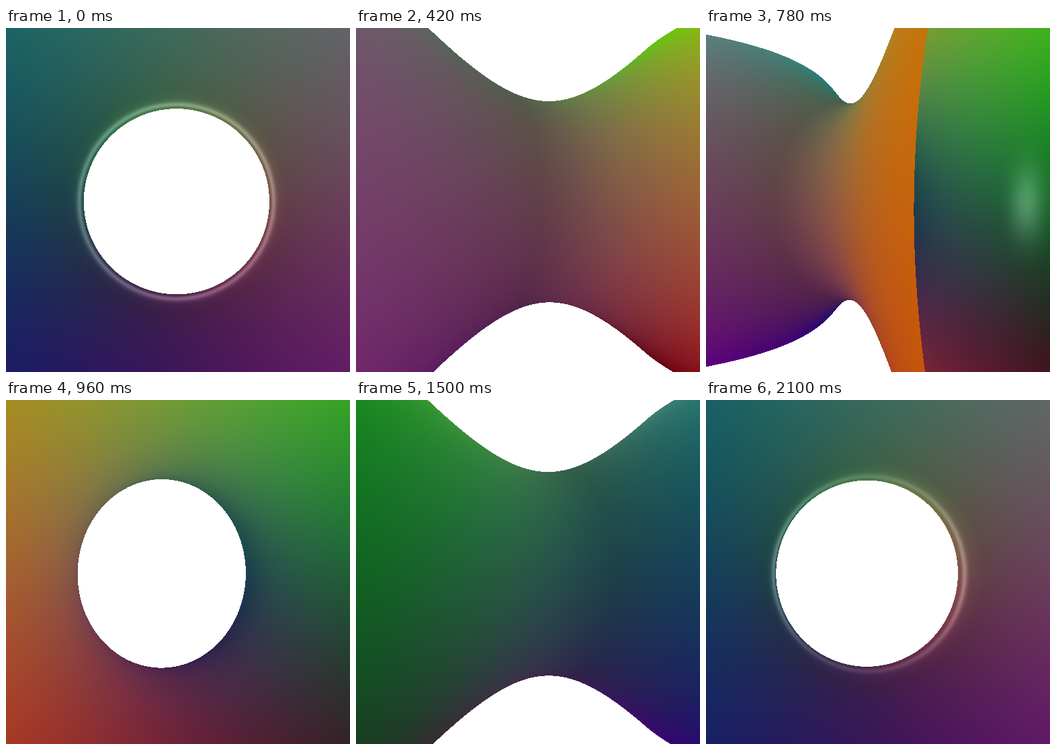
Animation, 512 px wide and 512 px high, one loop 2.16 s. Source, as an HTML page with a canvas:

```html
<!DOCTYPE html>
<html lang="en">
<head>
<meta charset="utf-8">
<title>Turning hyperboloid</title>
<style>
  html, body { margin: 0; width: 100%; height: 100%; overflow: hidden; background: #fff; }
  canvas { display: block; width: 100vw; height: 100vh; }
</style>
</head>
<body>
<canvas id="stage" width="512" height="512"></canvas>
<script>
const SIZE = 512, HALF = SIZE / 2;
const STEP = 60, STEPS = 36;
const DIST = 3.24;             // camera distance, in neck radii
const FOCAL = 470;             // pixels
const BOX = 2;                 // half side of the clipping cube
const AMBIENT = 0.5, DIFFUSE = 0.28, SPECULAR = 0.21, SHINE = 64;

// The surface sits slightly off the middle of the cube, which the camera circles.
const CENTER = { x: -0.016, y: -0.017, z: -0.013 };
const LIGHT = { x: -CENTER.x, y: -CENTER.y, z: -DIST - CENTER.z };

const ctx = document.getElementById('stage').getContext('2d');
const image = ctx.createImageData(SIZE, SIZE);
const data = image.data;

const inBox = (x, y, z) =>
  Math.abs(x + CENTER.x) <= BOX &&
  Math.abs(y + CENTER.y) <= BOX &&
  Math.abs(z + CENTER.z) <= BOX;

// Colour of a surface point seen along the ray (dx, dy, dz).
function shade(i, x, y, z, dx, dy, dz) {
  const n = -1 / Math.hypot(x, y, z);
  const nx = x * n, ny = y * n, nz = -z * n;

  let lx = LIGHT.x - x, ly = LIGHT.y - y, lz = LIGHT.z - z;
  const l = 1 / Math.hypot(lx, ly, lz);
  lx *= l; ly *= l; lz *= l;

  const facing = Math.max(0, nx * lx + ny * ly + nz * lz);
  let shine = 0;
  if (facing > 0) {
    const rx = 2 * facing * nx - lx;
    const ry = 2 * facing * ny - ly;
    const rz = 2 * facing * nz - lz;
    const glint = -(rx * dx + ry * dy + rz * dz) / Math.hypot(dx, dy, dz);
    if (glint > 0) shine = 255 * SPECULAR * Math.pow(glint, SHINE);
  }

  const lit = 255 * (AMBIENT + DIFFUSE * facing);
  data[i] = lit * (0.5 + 0.5 * (x + CENTER.x) / BOX) + shine;
  data[i + 1] = lit * (0.5 + 0.5 * (y + CENTER.y) / BOX) + shine;
  data[i + 2] = lit * (0.5 + 0.5 * (z + CENTER.z) / BOX) + shine;
}

// Casts one ray per pixel at x² + y² - z² = 1.
function render(angle) {
  const s = Math.sin(angle), c = Math.cos(angle);
  const ox = DIST * s - CENTER.x, oy = -CENTER.y, oz = DIST * c - CENTER.z;
  const e = ox * ox + oy * oy - oz * oz - 1;
  data.fill(255);

  for (let py = 0, i = 0; py < SIZE; py++) {
    const dy = (HALF - py - 0.5) / FOCAL;
    for (let px = 0; px < SIZE; px++, i += 4) {
      const u = (px + 0.5 - HALF) / FOCAL;
      const dx = u * c - s, dz = -u * s - c;
      const a = dx * dx + dy * dy - dz * dz;
      const b = ox * dx + oy * dy - oz * dz;
      const disc = b * b - a * e;
      if (disc < 0) continue;

      const q = -(b + (b < 0 ? -1 : 1) * Math.sqrt(disc));
      const t1 = q / a, t2 = e / q;
      let t = Math.min(t1, t2);
      for (let k = 0; k < 2; k++) {
        const x = ox + t * dx, y = oy + t * dy, z = oz + t * dz;
        if (t > 0 && inBox(x, y, z)) {
          shade(i, x, y, z, dx, dy, dz);
          break;
        }
        t = Math.max(t1, t2);
      }
    }
  }
  ctx.putImageData(image, 0, 0);
}

const start = performance.now();
let shown = -1;

function tick() {
  const step = Math.floor((performance.now() - start) / STEP) % STEPS;
  if (step !== shown) {
    shown = step;
    render(step / STEPS * 2 * Math.PI);
  }
  requestAnimationFrame(tick);
}
tick();
</script>
</body>
</html>
```
